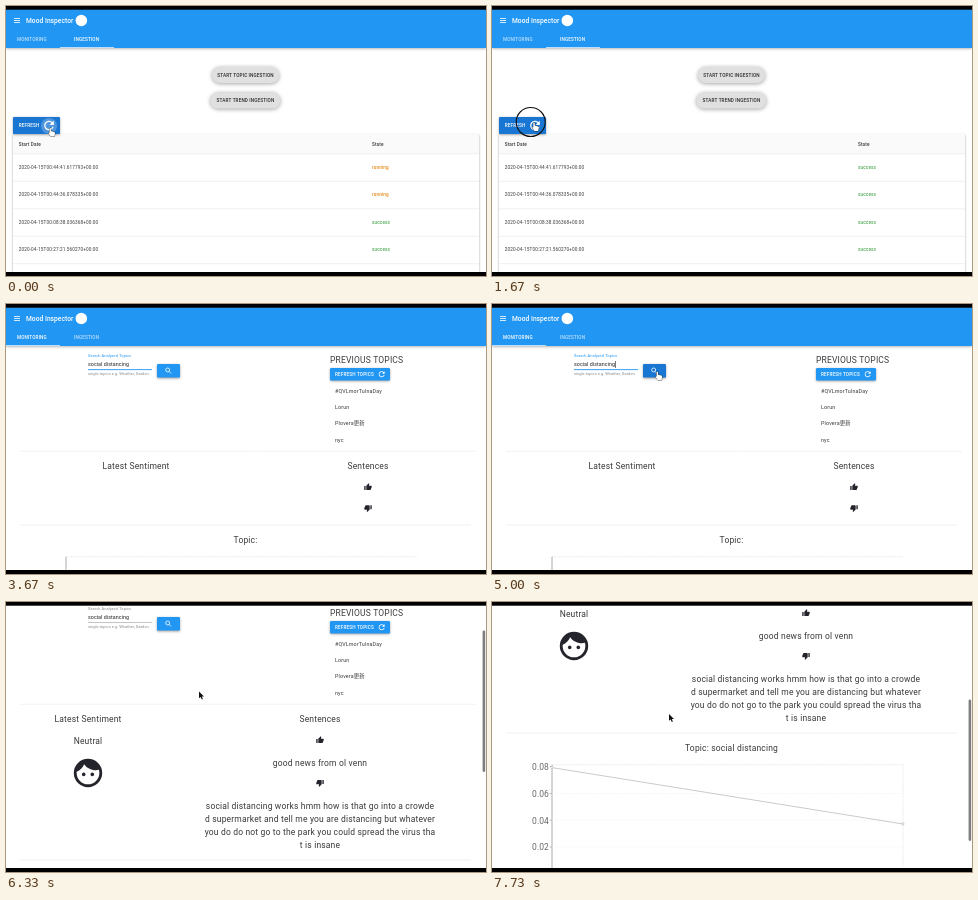
Animation, 480 px wide and 270 px high, one loop 8000 ms. Source, as an HTML page with a canvas:

```html
<!DOCTYPE html>
<html lang="en">
<head>
<meta charset="utf-8">
<title>Topic dashboard</title>
<style>
html, body { margin: 0; width: 100%; height: 100%; overflow: hidden; background: #fff; }
canvas { display: block; width: 480px; height: 270px; }
</style>
</head>
<body>
<canvas id="stage"></canvas>
<script>
const LOOP = 8000;
const BLUE = '#2196f3', DARK_BLUE = '#1976d2', INK = '#3a3a3a', DARK = '#24242c', RULE = '#e6e6e6';

const canvas = document.getElementById('stage');
const ctx = canvas.getContext('2d');
const ratio = window.devicePixelRatio || 1;
canvas.width = 480 * ratio;
canvas.height = 270 * ratio;

// Icons on a 24 unit grid
const ICON = {
  refresh: new Path2D('M17.65 6.35C16.2 4.9 14.21 4 12 4c-4.42 0-8 3.58-8 8s3.58 8 8 8c3.73 0 6.84-2.55 7.73-6h-2.08c-.82 2.33-3.04 4-5.65 4-3.31 0-6-2.69-6-6s2.69-6 6-6c1.66 0 3.14.69 4.22 1.78L13 11h7V4z'),
  thumb: new Path2D('M1 21h4V9H1zM23 10c0-1.1-.9-2-2-2h-6.3l1-4.9c0-.4-.2-.8-.5-1.1L14.2 1 7.6 7.6C7.2 8 7 8.5 7 9v10c0 1.1.9 2 2 2h9c.8 0 1.5-.5 1.8-1.2l3-7c.1-.3.2-.5.2-.8z'),
  face: new Path2D('M12 2a10 10 0 1 0 0 20 10 10 0 1 0 0-20zm0 18c-4.4 0-8-3.6-8-8 0-.3 0-.6.05-.86 2.36-1.05 4.23-2.98 5.21-5.37C11.07 8.33 14.05 10 17.42 10c.78 0 1.53-.09 2.25-.26.21.71.33 1.47.33 2.26 0 4.4-3.6 8-8 8z'),
  search: new Path2D('M15.5 9.5a6 6 0 1 0-12 0 6 6 0 1 0 12 0M14 14l6 6')
};
const HAND = new Path2D('M1.3 1Q2 0 2.7 1V3.6L6 4.4Q7 4.8 6.8 5.8L6.2 9H2.6L.2 5.8Q.2 4.8 1.3 5.4Z');
const ARROW = new Path2D('M0 0V6.8L1.6 5.4 2.8 8 3.9 7.5 2.8 5H5Z');

// Value held since the last key time
function held(keys, t) {
  let value = keys[0][1];
  for (const [at, v] of keys) if (t >= at) value = v;
  return value;
}

const SCROLL = [[0, 0], [5330, 4], [5670, 9], [5730, 16], [6000, 24], [6070, 29], [6130, 34],
  [6330, 45], [6670, 50], [7000, 100], [7070, 125], [7330, 160], [7400, 172]];
const POINTER = [[0, [HAND, 42.2, 121.5]], [1000, [HAND, 41.5, 102.5]], [1330, [HAND, 41.5, 112.5]],
  [1670, [HAND, 40, 116]], [2000, [HAND, 22.5, 33.5]], [3000, null], [4000, [ARROW, 146, 70]],
  [4330, [ARROW, 156, 75]], [4670, [HAND, 163.3, 67.2]], [5330, [ARROW, 192, 89]],
  [6330, [ARROW, 193, 89.5]], [7730, [ARROW, 177, 112]]];
const CLICK_RING = [[0, null], [1670, [38.7, 116]], [2000, null], [2330, [23, 32]], [2670, null]];
const CARET = [[0, true], [3670, false], [4670, true], [5330, false]];

function text(s, x, y, size, { color = INK, weight = 400, align = 'left', gap = 0.13 } = {}) {
  ctx.font = `${weight} ${size}px Roboto, "Noto Sans CJK SC", "Noto Sans CJK JP", sans-serif`;
  ctx.letterSpacing = gap + 'px';
  ctx.textAlign = align;
  ctx.fillStyle = color;
  ctx.fillText(s, x, y + size * 0.355);
}
const label = (s, x, y, o) => text(s, x, y, 4.67, { color: '#fff', weight: 500, ...o });
const heading = (s, x, y, align = 'center') => text(s, x, y, 8.5, { align, gap: 0.17 });

function rect(x, y, w, h, color) {
  ctx.fillStyle = color;
  ctx.fillRect(x, y, w, h);
}

function disc(x, y, r, color) {
  ctx.fillStyle = color;
  ctx.beginPath();
  ctx.arc(x, y, r, 0, 7);
  ctx.fill();
}

function line(x1, y1, x2, y2, color, width = 0.6, dash = []) {
  ctx.strokeStyle = color;
  ctx.lineWidth = width;
  ctx.setLineDash(dash);
  ctx.beginPath();
  ctx.moveTo(x1, y1);
  ctx.lineTo(x2, y2);
  ctx.stroke();
  ctx.setLineDash([]);
}

function raised(x, y, w, h, r, color, blur = 2.5) {
  ctx.save();
  ctx.shadowColor = 'rgba(0,0,0,.38)';
  ctx.shadowBlur = blur * ratio;
  ctx.shadowOffsetY = 0.8 * ratio;
  ctx.fillStyle = color;
  ctx.beginPath();
  ctx.roundRect(x, y, w, h, r);
  ctx.fill();
  ctx.restore();
}

function icon(path, x, y, scale, color, { turn = 0, stroke = 0 } = {}) {
  ctx.save();
  ctx.translate(x, y);
  ctx.rotate(turn);
  ctx.scale(scale, scale);
  ctx.translate(-12, -12);
  ctx.fillStyle = ctx.strokeStyle = color;
  ctx.lineWidth = stroke;
  if (stroke) ctx.stroke(path);
  else ctx.fill(path, 'evenodd');
  ctx.restore();
}

function header(monitoring, t) {
  raised(0, 0, 480, 42, 0, BLUE, 3);
  for (let i = 0; i < 3; i++) rect(8, 12 + i * 2, 6, 0.8, '#fff');
  text('Mood Inspector', 20, 14.5, 6.67, { color: '#fff', weight: 500, gap: 0.03 });
  disc(75.3, 14.5, 5.8, '#fff');
  if (t >= 2670 && t < 3000) disc(24, 33.5, 12, 'rgba(255,255,255,.16)');
  const dim = 'rgba(255,255,255,.7)';
  label('MONITORING', 11, 33.5, { color: monitoring ? '#fff' : dim });
  label('INGESTION', 68, 33.5, { color: monitoring ? dim : '#fff' });
  rect(monitoring ? 0 : 54, 41.2, 54, 0.8, '#e3f1fd');
}

function refreshRipple(t) {
  if (t >= 1000) return;
  const p = Math.min(1, Math.max(0, (t - 330) / 400));
  ctx.save();
  ctx.beginPath();
  ctx.rect(7, 111, 47, 17);
  ctx.clip();
  disc(43, 120, 8 + 26 * p, `rgba(255,255,255,${0.24 * (1 - p)})`);
  ctx.restore();
}

function ingestion(t) {
  raised(206, 61, 67, 16, 8, '#e0e0e0', 4);
  label('START TOPIC INGESTION', 239.5, 69.2, { color: '#2b2b2b', align: 'center' });
  raised(204.3, 86.5, 70, 16, 8, '#e0e0e0', 4);
  label('START TREND INGESTION', 239.5, 94.6, { color: '#2b2b2b', align: 'center' });

  raised(7, 128, 466, 150, 0, '#fff', 2);
  rect(7, 128, 466, 20, '#fafafa');
  raised(7, 111, 47, 17, 1, t < 2000 ? DARK_BLUE : BLUE);
  refreshRipple(t);
  label('REFRESH', 12.7, 119.7);
  icon(ICON.refresh, 43, 119.5, 0.6, '#fff');

  label('Start Date', 12.7, 138, { color: INK });
  label('State', 366, 138, { color: INK });
  const rows = ['44:41.617793', '44:36.078335', '08:38.036368', '27:21.560270'];
  rows.forEach((time, i) => {
    const y = 161.3 + i * 27.5;
    const running = i < 2 && t < (i ? 1000 : 1670);
    text(`2020-04-15T00:${time}+00:00`, 12.7, y, 4.67);
    label(running ? 'running' : 'success', 366, y, { color: running ? '#e88a1a' : '#55ab5a' });
    line(7, y - 13.5, 473, y - 13.5, RULE);
  });
  line(7, 257.7, 473, 257.7, RULE);
}

function searchForm(t) {
  const focused = t < 5330;
  const accent = focused ? BLUE : '#8a8a8a';
  const typed = t < 3330 ? 'social distancin' : 'social distancing';
  text('Search Analyzed Topics', 82, 52, 4, { color: accent, gap: 0.04 });
  text(typed, 82, 60.3, 5.33, { color: '#222', gap: 0.06 });
  if (held(CARET, t)) rect(t < 3330 ? 120.5 : 123.4, 57, 0.6, 7, '#222');
  rect(82, 65.2, 64, focused ? 0.9 : 0.5, accent);
  text('single topics e.g. Weather, Garden', 82, 70, 4, { color: '#888', gap: 0.02 });
  raised(151, 60, 23, 13.6, 1.2, t >= 4670 && focused ? DARK_BLUE : BLUE);
  icon(ICON.search, 162.5, 66.8, 0.33, '#fff', { stroke: 2.4 });
}

function topicList() {
  heading('PREVIOUS TOPICS', 324, 56.3, 'left');
  raised(324, 64, 60, 12.4, 1.2, BLUE);
  label('REFRESH TOPICS', 329, 70.2);
  icon(ICON.refresh, 375.7, 70.2, 0.37, '#fff');
  ['#QVLmorTulnaDay', 'Lorun', 'Plovera更新', 'nyc'].forEach((s, i) =>
    text(s, 329, 87 + i * 16.3, 5.33, { gap: 0.16 }));
}

function sentiment(done) {
  const left = done ? 82 : 130, right = left + 232;
  line(14, 147.3, 470, 147.3, RULE, 0.6, [1.5, 0.5]);
  heading('Latest Sentiment', left, 162.3);
  heading('Sentences', right, 162.3);
  icon(ICON.thumb, right, 183, 0.34, DARK);
  icon(ICON.thumb, right, done ? 226 : 204.3, 0.34, DARK, { turn: Math.PI });
  if (!done) return;
  heading('Neutral', left, 184.3);
  icon(ICON.face, left, 216, 1.42, DARK);
  disc(left - 4.3, 217.4, 1.8, DARK);
  disc(left + 4.3, 217.4, 1.8, DARK);
  heading('good news from ol venn', right, 205.5);
  ['social distancing works hmm how is that go into a crowde',
    'd supermarket and tell me you are distancing but whatever',
    'you do do not go to the park you could spread the virus tha',
    't is insane'].forEach((s, i) => heading(s, right, 248.5 + i * 13));
}

function chart(done) {
  const y = done ? 318.3 : 236.3;
  line(14, y - 15.3, 465, y - 15.3, RULE);
  heading(done ? 'Topic: social distancing' : 'Topic:', 239.5, y);
  line(60, y + 16.5, 411, y + 16.5, '#d4d4d4', 0.6, [1.2, 1.2]);
  line(60, y + 16.5, 60, y + 140, '#999', 0.8);
  if (!done) return;
  line(411, y + 16.5, 411, y + 140, '#d4d4d4', 0.6, [1.2, 1.2]);
  for (let i = 0; i < 4; i++) {
    const tick = y + 18.3 + i * 26.8;
    if (i) line(60, tick, 411, tick, '#ececec', 0.6, [1.2, 1.2]);
    line(57.5, tick, 60, tick, '#999');
    text((0.08 - i * 0.02).toFixed(2), 57, tick + 0.4, 8.5, { color: '#666', align: 'right', gap: 0.1 });
  }
  line(60, y + 19.3, 411, y + 75.7, '#bdbdbd', 0.8);
  for (const [px, py] of [[60, 19.3], [411, 75.7]]) {
    disc(px, y + py, 1.4, '#bdbdbd');
    disc(px, y + py, 0.8, '#fff');
  }
}

function pointer(t) {
  const ring = held(CLICK_RING, t);
  if (ring) {
    ctx.strokeStyle = '#111';
    ctx.lineWidth = 1.1;
    ctx.beginPath();
    ctx.arc(...ring, 14.5, 0, 7);
    ctx.stroke();
  }
  const shape = held(POINTER, t);
  if (!shape) return;
  const [path, x, y] = shape;
  ctx.save();
  ctx.translate(x, y);
  ctx.lineJoin = 'round';
  ctx.lineWidth = 0.8;
  ctx.fillStyle = path === HAND ? '#fff' : '#111';
  ctx.strokeStyle = path === HAND ? '#222' : '#fff';
  ctx.stroke(path);
  ctx.fill(path);
  ctx.restore();
}

function draw(t) {
  const monitoring = t >= 3000, done = t >= 5330, scroll = held(SCROLL, t);
  ctx.setTransform(ratio, 0, 0, ratio, 0, 0);
  rect(0, 0, 480, 270, '#fff');
  ctx.translate(0, -scroll);
  if (monitoring) {
    searchForm(t);
    topicList();
    sentiment(done);
    chart(done);
  } else {
    ingestion(t);
  }
  header(monitoring, t);
  ctx.translate(0, scroll);
  if (t >= 6000) {
    ctx.fillStyle = '#7d7d7d';
    ctx.beginPath();
    ctx.roundRect(476.6, 4 + scroll * 0.543, 2.6, 141.5, 1.3);
    ctx.fill();
  }
  pointer(t);
  rect(0, 0, 480, 3.7, '#000');
  rect(0, 266, 480, 4, '#000');
}

const start = performance.now();
function tick() {
  draw((performance.now() - start) % LOOP);
  requestAnimationFrame(tick);
}
tick();
</script>
</body>
</html>
```
